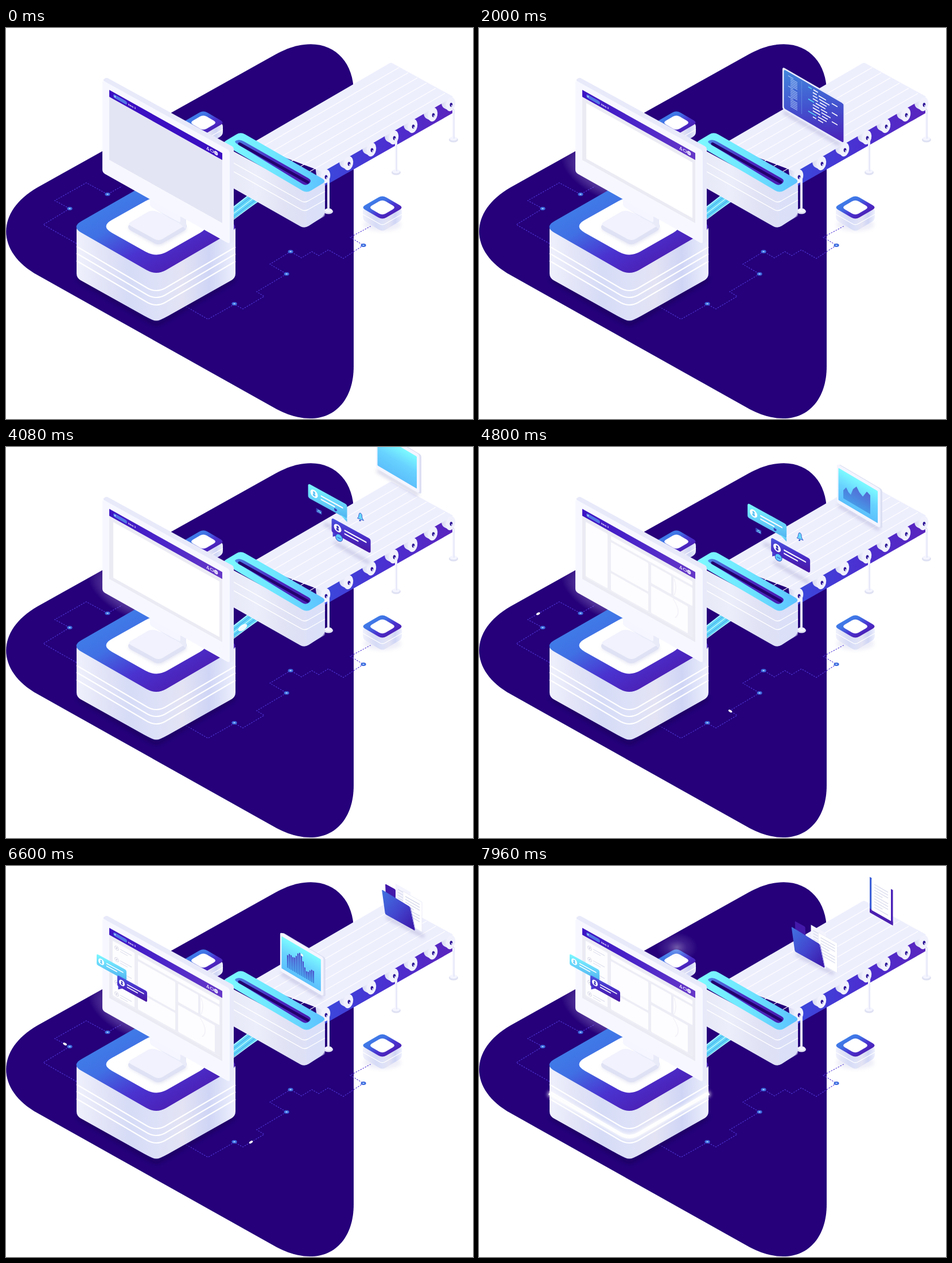
These frames come from a looping animation (814 by 682 pixels, 8000 ms). An HTML page:

```html
<!DOCTYPE html>
<html lang="en">
<head>
<meta charset="utf-8">
<title>Conveyor</title>
<style>
html, body { margin: 0; width: 100%; height: 100%; overflow: hidden; background: #fff; }
svg { display: block; width: 100vw; height: 100vh; }
</style>
</head>
<body>
<svg id="stage" viewBox="0 0 814 682" xmlns="http://www.w3.org/2000/svg"></svg>
<script>
const LOOP = 8000;
const SPEED = 0.0812;
const SLOPE = 0.588;
const stage = document.getElementById('stage');

// Markup helpers
const grad = (id, dir, ...stops) => {
  const [x1, y1, x2, y2] = dir;
  const inner = stops.map((c, i) => `<stop offset="${i / (stops.length - 1)}" stop-color="${c}"/>`).join('');
  return `<linearGradient id="${id}" x1="${x1}" y1="${y1}" x2="${x2}" y2="${y2}">${inner}</linearGradient>`;
};
const parse = s => s.split(' ').map(p => p.split(',').map(Number));
const poly = (pts, fill, r = 0, extra = '') => {
  const p = parse(pts), n = p.length;
  const toward = (a, b) => {
    const len = Math.hypot(b[0] - a[0], b[1] - a[1]), k = Math.min(r / len, 0.5);
    return `${(a[0] + (b[0] - a[0]) * k).toFixed(1)},${(a[1] + (b[1] - a[1]) * k).toFixed(1)}`;
  };
  const d = p.map((a, i) =>
    `${i ? 'L' : 'M'}${toward(a, p[(i + n - 1) % n])}Q${a} ${toward(a, p[(i + 1) % n])}`).join('');
  return `<path d="${d}Z" fill="${fill}" ${extra}/>`;
};
const rect = (x, y, w, h, fill, rx = 0, extra = '') =>
  `<rect x="${x}" y="${y}" width="${w}" height="${h}" rx="${rx}" fill="${fill}" ${extra}/>`;
const oval = (x, y, rx, ry, fill, extra = '') =>
  `<ellipse cx="${x}" cy="${y}" rx="${rx}" ry="${ry}" fill="${fill}" ${extra}/>`;
const line = (d, stroke, w = 1, extra = '') =>
  `<path d="${d}" fill="none" stroke="${stroke}" stroke-width="${w}" ${extra}/>`;
const skew = (k, inner) => `<g transform="matrix(1 ${k} 0 1 0 0)">${inner}</g>`;
const at = (x, y, inner, s = 1) => `<g transform="translate(${x} ${y}) scale(${s})">${inner}</g>`;
const group = (id, inner, extra = '') => `<g id="${id}" ${extra}>${inner}</g>`;
const times = (n, f) => Array.from({ length: n }, (_, i) => f(i)).join('');

const diag = [0, 0, 1, 1], across = [0, 0, 1, 0], down = [0, 0, 0, 1];
const defs = `<defs>
${grad('top', [.15, .15, .8, .8], '#3f82ea', '#4070e4', '#4a33d0', '#4b1fb4')}
${grad('side', across, '#f0f1fd', '#e2e4f7', '#d6dbf6', '#dde1f8', '#e3e3f4', '#cfd5f5', '#eef0fd')}
${grad('face', across, '#e6e7f6', '#eceefb', '#dfe1f4', '#dce1fa')}
${grad('cyan', diag, '#7cfaff', '#69d4fa', '#4fb2f0')}
${grad('glass', down, '#7cfaff', '#68d2ff', '#5cc0fb')}
${grad('machine', across, '#7dfaff', '#6ee6ff', '#5cc2ff')}
${grad('violet', diag, '#4a55df', '#4a2cc6', '#46159f')}
${grad('code', diag, '#4186dc', '#4353cf', '#4a1fb6')}
${grad('slot', across, '#4a83e4', '#4a2bc4', '#4a1caf')}
${grad('under', across, '#3a49dc', '#4b2fd0', '#5a24bd')}
${grad('folder', diag, '#4173e0', '#4246cf', '#3a13a6')}
${grad('head', across, '#3c14c4', '#4c26c8', '#6638c8')}
${grad('chart', down, '#4a3ec4', '#3f8ae0')}
${grad('tube', across, '#d3d6f0', '#f8f9ff')}
<radialGradient id="halo"><stop offset="0" stop-color="#fff" stop-opacity=".7"/><stop offset=".5" stop-color="#cfc6f5" stop-opacity=".28"/><stop offset="1" stop-color="#fff" stop-opacity="0"/></radialGradient>
<filter id="blur" x="-40%" y="-40%" width="180%" height="180%"><feGaussianBlur stdDeviation="3"/></filter>
<clipPath id="above"><path d="M0-100H814V434L0-21Z"/></clipPath>
</defs>`;

// Scenery
const blob = `<path fill="#25007a" d="M470 46C548 3 606 43 606 112V590C606 667 548 705 472 665L55 431C-18 390-18 320 55 278Z"/>`;

const leftTrack = 'M123 376L65 343L111 315L85 301L140 270L177 290L202 276';
const rightTrack = 'M314 486L352 508L398 482L413 490L450 468L437 460L489 429L460 412L496 390L515 401L533 390L545 397L562 387L588 402L623 379L600 365L637 345';
const track = (id, d) => line(d, '#5236d8', 1.1, `id="${id}" stroke-dasharray="2.5 2"`);
const node = (x, y) => oval(x, y, 4.6, 3, '#3c68dd') + oval(x, y, 1.8, 1.1, '#a9d4ff');
const tracks = track('trackL', leftTrack) + track('trackR', rightTrack) +
  parse('177,290 111,315 496,390 489,429 398,481 623,379').map(p => node(...p)).join('');

const cube = (x, y) => at(x, y,
  oval(0, 30, 33, 11, '#8a8fd0', 'opacity=".15" filter="url(#blur)"') +
  poly('-34,1 34,1 34,22 0,42 -34,22', 'url(#side)', 6) +
  line('M-34 12L-4 29Q0 31 4 29L34 12', '#fff', 1.3) +
  poly('-37,0 0,-21.5 37,0 0,21.5', 'url(#top)', 8) +
  poly('-24,0 0,-14 24,0 0,14', '#fff', 7));

const leg = (x, y1, y2) => oval(x, y2 + 2, 8, 4.5, '#dfe1f3') + oval(x, y2, 6.5, 3.5, '#f4f5ff') +
  line(`M${x} ${y1}V${y2}`, '#e6e8f9', 4) + line(`M${x - 1} ${y1}V${y2}`, '#f8f9ff', 1.5);
const rollers = parse('557,259 597,236 637,212 676,191 709,171 744,151 775,133');
const tube = ([x, y]) => poly(`${x - 18},${y - 17} ${x - 1},${y - 12} ${x - 1},${y + 12} ${x - 15},${y + 5}`, 'url(#tube)', 5);
const wheel = ([x, y]) => oval(x, y, 8, 12.3, '#f0f1fd', `transform="rotate(12 ${x} ${y})"`) +
  oval(x + 1, y + 1, 2.4, 3.6, '#2d1596') + oval(x + 2, y + 2.5, 1, 1.6, '#dfe2fa');
const belt = poly('776,121 781,147 556,275 550,250', 'url(#under)') + rollers.map(tube).join('') +
  poly('671,60 780,120 552,251 425,203', '#eeeffd', 3) +
  times(6, i => line(`M${685 + i * 16} ${69 + i * 9}L${440 + i * 16} ${211 + i * 9}`, '#fff', 1.1)) +
  rollers.map(wheel).join('') + leg(780, 142, 193) + leg(680, 194, 250);

const strip = poly('368,333 425,289 443,301 385,341', '#62d6f8') +
  times(5, i => line(`M${370 + i * 4} ${334 + i * 2}L${424 + i * 4.3} ${291 + i * 2.4}`, i % 2 ? '#4aa9ec' : '#c9fbff', 1.1)) +
  oval(0, 0, 9, 4.5, '#fff', 'id="spark" opacity="0"');

const machine = poly('376,204 524,284 556,266 556,327 520,350 376,268', 'url(#face)', 9) +
  poly('524,284 556,266 556,328 524,346', '#dbe0fa', 3, 'opacity=".55"') +
  line('M380 226L515 302Q520 305 526 302L556 285M380 241L515 317Q520 320 526 317L556 300', '#fff', 1.4) +
  poly('376,201 409,181 559,267 524,288', 'url(#machine)', 9) +
  poly('396,198 408,194 534,266 523,276', 'url(#slot)', 8) +
  line('M407 202L526 269', '#22006e', 5, 'stroke-linecap="round"') + leg(562, 262, 318);

const band = y => line(`M123 ${y}L247 ${y + 73}Q262 ${y + 81} 277 ${y + 73}L400 ${y + 1}`, '#fff', 2.2);
const base = poly('124,432 262,514 400,432 400,442 262,522 124,442', '#16004f', 10, 'opacity=".5" filter="url(#blur)"') +
  poly('123,345 400,345 400,436 276,506 262,512 248,506 123,436', 'url(#side)', 8) +
  band(381) + band(393) + band(406) +
  group('bandGlow', `<g filter="url(#blur)">${line('M121 396L247 468Q262 476 277 468L402 396', '#fff', 8)}</g>` +
    line('M122 397L247 469Q262 477 277 469L401 397', '#fff', 4), 'opacity="0"') +
  poly('114,347 262,262 408,347 262,432', 'url(#top)', 20) +
  poly('165,346 262,291 358,346 262,401', '#fff', 22);

const stand = poly('210,349 252,324 319,350 266,381', '#d5d8ee', 10, 'opacity=".8" filter="url(#blur)"') +
  poly('213,342 315,340 315,351 266,379 213,351', '#dfe1f4', 7) +
  poly('211,342 254,317 318,341 266,372', '#f1f2fd', 8) +
  poly('251,290 314,325 314,352 303,341 282,330 251,310', '#e9ebf9', 4) +
  poly('251,290 304,318 304,340 251,311', '#f5f6ff', 4);

// Items
const person = (x, y, r, ink) => `<circle cx="${x}" cy="${y}" r="${r}" fill="#fff"/><circle cx="${x}" cy="${y - r * .3}" r="${r * .32}" fill="${ink}"/>` +
  rect(x - r * .35, y + r * .05, r * .7, r * .6, ink, r * .2);
const chat = (fill, ink, tailRight) => skew(.55,
  rect(0, 0, 68, 25, fill, 3.5) +
  `<path fill="${fill}" d="${tailRight ? 'M56 24H68V30Z' : 'M2 24H12L2 32Z'}"/>` +
  person(10.5, 12.5, 6.5, ink) + rect(22, 8.5, 39, 2.4, '#fff', 1) + rect(22, 14.5, 25, 2.2, '#fff', 1));
const shade = d => line(d, '#8e8fc4', 6, 'opacity=".4" filter="url(#blur)"');
const cyanChat = chat('url(#cyan)', '#5cc4f4', true), violetChat = chat('url(#violet)', '#3f35b8', false);

const mail = poly('14,44 24,49 24,56 14,51', '#3a3fb8', 1) + poly('16,46.5 22.5,50 22.5,54 16,50.5', '#6fd4fb') + line('M14.5 45L18.5 51L24 50', '#3a3fb8', 1);
const bell = `<path d="M86 62Q88.500 60 88.500 56Q89 52 91.500 53Q94.500 55 94 60Q95 64 97 66Z" fill="#69d9fb" stroke="#3550c8" stroke-width=".9"/>` + oval(90.5, 66, 1.6, 1.3, '#3550c8');
const like = poly('48,90 54,89 60,95 60,102 54,103 48,98', '#5cc9fb', 4, 'stroke="#3445c4" stroke-width="1"') +
  line('M51 95L57 98', '#3445c4', 1) + poly('45.5,44 50.5,47 50.5,49.5 47.5,50 45.5,47', '#3938b4', 1);
const chats = shade('M28 72L70 92M45 104L107 140') + at(0, 1, cyanChat) + at(41, 61, violetChat) + mail + bell + like;

const codeLines = times(18, i => rect(i % 6 ? 14 : 10, 9 + i * 3, i % 6 ? 12 : 9, 1.3, '#a8c4f5')) +
  rect(33, 6, .7, 57, '#6f93e4') +
  times(10, i => {
    const y = 8 + i * 5.3, x = i % 4 ? 53 : 45, w = 6 + i * 37 % 9;
    return rect(x, y, w, 1.8, i % 4 ? '#fff' : '#59d9f5') + rect(x + w + 3, y, 8 + i * 5 % 11, 1.8, '#fff') +
      (i % 3 == 1 ? rect(86, y, 10, 1.8, '#fff') : '');
  });
const codePanel = shade('M2 79L100 136') + skew(.578,
  rect(0, 0, 109, 74, '#e9ebfb', 4) + rect(2.5, 3, 104, 68, 'url(#code)', 3) + codeLines);

const heights = x => 17 + 11 * Math.sin(x * .42 - .9) + 7 * Math.sin(x * .93 + 1);
const bars = times(16, i => { const h = 10 + heights(i) * .85; return rect(12 + i * 3, 55 - h, 2.1, h, 'url(#chart)'); });
const hills = `<path fill="url(#chart)" opacity=".75" d="M11 54V40L16 32L20 38L24 40L28 28L34 20L39 27L45 31L52 18L58 21V54Z"/>`;
const tablet = shade('M2 72L74 115') + skew(.59,
  rect(3, -1.5, 76, 69, '#dcdff3', 4) + rect(0, 0, 75.5, 68, '#f4f5ff', 4) + rect(2.5, 6, 68.5, 56, 'url(#glass)', 1) +
  group('hills', hills) + group('bars', bars + '<circle cx="38" cy="18" r="2.2" fill="#fff"/>'));

const textRows = (x, y, w, n, step = 5) => times(n, i => rect(x, y + i * step, i % 4 == 3 ? w * .6 : w, 1.3, '#d3d6ea'));
const folder = shade('M8 58L74 92') + poly('6,0 24,10 26,50 8,45', '#4319aa', 2) +
  group('sheets', skew(.57, rect(24, -14, 26, 62, '#f3f4fd') + textRows(28, -7, 18, 8) +
    rect(37, -8, 33, 52, '#fff', 0, 'stroke="#e6e8f6" stroke-width=".7"') + textRows(41, -2, 25, 7))) +
  poly('0,10 49,40 58,82 6,53', 'url(#folder)', 2) + line('M50 41L58 80', '#8d86e0', 1);
const clip = poly('0,0 3.5,2 3.5,62 0,61', '#3f62d8') + poly('37,21 40.5,23 40.5,84 37,82', '#4a22b8') +
  poly('0,55 40.5,78 40.5,85 0,62', '#4a1fb0', 1) + poly('3.5,4 37,23 37,77 3.5,58', '#fff') + skew(.57, textRows(8, 8, 24, 9, 5));

// Monitor
const card = (x, y, w, h) => rect(x, y, w, h, '#fdfdff', 1.5);
const cards = rect(5, 17, 188, 99, '#ededf6') + card(6, 19, 38, 95) + card(50, 19, 142, 7) +
  card(50, 30, 65, 50) + card(50, 84, 65, 30) + card(120, 30, 35, 32) + card(159, 30, 33, 32) + card(120, 67, 64, 47) +
  line('M160 32Q166 46 160 61M158 68Q174 83 162 99', '#f2f2f8', 1.5);
const list = times(5, i => {
  const y = 28 + i * 20;
  return `<circle cx="13" cy="${y}" r="3.3" fill="#fff" stroke="#d9d9e8"/><circle cx="13" cy="${y}" r="1.3" fill="#c9c9de"/>` +
    rect(19, y - 2, 20, 1.2, '#d9dbeb') + rect(19, y + 2, 13, 1.2, '#d9dbeb');
});
const header = fill => rect(0, 0, 197, 12, fill);
const screen = at(180, 108, skew(.56,
  rect(0, 0, 197, 122, '#e4e5f4') + header('#3b0fc2') +
  group('lit', rect(0, 0, 197, 122, '#ebebf4') + header('url(#head)') + rect(7, 19, 185, 97, '#fff')) +
  group('cards', cards) + group('list', list) +
  rect(7, 3, 24, 6, '#5377e4', 3) + '<circle cx="10" cy="6" r="1.3" fill="#b9d2ff"/>' +
  '<text x="33" y="8" font-family="Arial, Liberation Sans, sans-serif" font-size="4.5" font-weight="700" fill="#fff">Item 3</text>' +
  '<path d="M170 8L172 3.500L174 8Z" fill="none" stroke="#fff" stroke-width=".9"/>' +
  rect(176.5, 4, 5, 4, 'none', 1, 'stroke="#fff" stroke-width=".9"') +
  '<circle cx="186" cy="6" r="2.900" fill="#cfc6f5" stroke="#fff" stroke-width=".9"/>'));
const monitor = poly('168,91 175,86 397,208 397,373 389,377 380,220', '#e8eafa', 4) +
  poly('168,91 390,214 390,377 168,252', '#f7f8ff', 5) + screen +
  group('popA', at(158, 153, cyanChat, .765)) + group('popB', at(194, 190, violetChat, .765));

const pulse = id => oval(0, 0, 3.6, 1.9, '#fff', `id="${id}" opacity="0"`);

stage.innerHTML = defs + blob + tracks + pulse('dotL') + pulse('dotR') +
  group('glow', oval(213, 255, 78, 38, 'url(#halo)', 'transform="rotate(30 213 255)"')) +
  cube(344, 165) + oval(345, 142, 36, 26, 'url(#halo)', 'id="cubeGlow"') + cube(656, 313) +
  belt + strip + machine +
  `<g clip-path="url(#above)">${group('clip', clip)}${group('folder', folder)}${group('tablet', tablet)}${group('chats', chats)}${group('code', codePanel)}</g>` +
  base + stand + monitor;

// Motion
const el = {};
stage.querySelectorAll('g[id], ellipse[id], path[id]').forEach(e => el[e.id] = e);
const clamp = x => Math.max(0, Math.min(1, x));
const ramp = (t, a, b) => clamp((t - a) / (b - a));
const ease = (t, a, b) => (1 - Math.cos(Math.PI * ramp(t, a, b))) / 2;
const bump = (t, mid, half) => Math.pow(Math.cos(Math.PI / 2 * Math.min(1, Math.abs(t - mid) / half)), 2);
const fade = (id, v) => el[id].setAttribute('opacity', v.toFixed(3));
const move = (id, x, y) => el[id].setAttribute('transform', `translate(${x.toFixed(2)} ${y.toFixed(2)})`);

// Fades in above the belt, lands, rides along it, then sinks into the slot.
function ride(id, t, { x, y, ref, lead, from, land, drop, sink }) {
  const d = Math.max(-lead, SPEED * (t - ref));
  const stop = sink ? Math.min(d, SPEED * (sink - ref)) : d;
  const lift = drop * (1 - ease(t, from, land));
  const fall = sink ? 150 * Math.pow(ramp(t, sink, sink + 330), 1.4) : 0;
  move(id, x - stop, y + SLOPE * stop - lift + fall);
  fade(id, sink && t > sink + 330 ? 0 : ramp(t, from, from + 250));
}

const lenL = el.trackL.getTotalLength(), lenR = el.trackR.getTotalLength();
function runDot(id, path, len, t) {
  const d = [4282, 6206].map(s => (t - s) * .33).find(v => v > 0 && v < len);
  fade(id, d === undefined ? 0 : 1);
  if (d === undefined) return;
  const p = path.getPointAtLength(d), q = path.getPointAtLength(Math.min(len, d + 1)), o = path.getPointAtLength(Math.max(0, d - 1));
  const a = Math.atan2(q.y - o.y, q.x - o.x) * 180 / Math.PI;
  el[id].setAttribute('transform', `translate(${p.x} ${p.y}) rotate(${a})`);
}

function draw(t) {
  const lit = ease(t, 60, 700);
  fade('lit', lit);
  fade('glow', lit);
  fade('cards', ease(t, 4300, 4900));
  fade('list', ease(t, 5400, 5850));

  const p = ease(t, 880, 3150), x = 641 - 229 * p;
  const fall = 160 * Math.pow(ramp(t, 3020, 3380), 1.5);
  move('code', x, 67 + (530 - x) * .58 - 60 * (1 - ease(t, 400, 860)) + fall);
  fade('code', t > 3380 ? 0 : ramp(t, 400, 650));

  ride('chats', t, { x: 624, y: 5, ref: 2880, lead: 16, from: 2200, land: 2680, drop: 50, sink: 5560 });
  ride('tablet', t, { x: 624, y: 29, ref: 4800, lead: 21, from: 3700, land: 4460, drop: 96, sink: 7200 });
  ride('folder', t, { x: 655, y: 31, ref: 6600, lead: 6, from: 5940, land: 6500, drop: 40 });
  move('sheets', 10 * ease(t, 6700, 7500), 7 * ease(t, 6700, 7500));
  move('clip', 681, 19);
  fade('clip', ease(t, 7600, 7880));
  fade('hills', ramp(t, 4300, 4700) * (1 - ramp(t, 5300, 5900)));
  fade('bars', ramp(t, 4900, 5900));

  const a = ease(t, 5960, 6250), b = ease(t, 6120, 6420);
  fade('popA', a);
  fade('popB', b);
  move('popA', 0, 8 * (1 - a));
  move('popB', 0, 8 * (1 - b));

  const s = [3900, 5950, 7500].map(v => (t - v) / 360).find(v => v > 0 && v < 1);
  fade('spark', s === undefined ? 0 : .9);
  if (s !== undefined) el.spark.setAttribute('transform', `translate(${440 - 55 * s} ${296 + 38 * s}) rotate(-35)`);

  runDot('dotL', el.trackL, lenL, t);
  runDot('dotR', el.trackR, lenR, t);
  fade('bandGlow', Math.max(bump(t, 6130, 230), bump(t, 7980, 300)));
  fade('cubeGlow', .55 * Math.max(bump(t, 5900, 350), bump(t, 7900, 320)));
}

let start;
function tick(now) {
  if (start === undefined) start = now;
  draw((now - start) % LOOP);
  requestAnimationFrame(tick);
}
draw(0);
requestAnimationFrame(tick);
</script>
</body>
</html>
```
